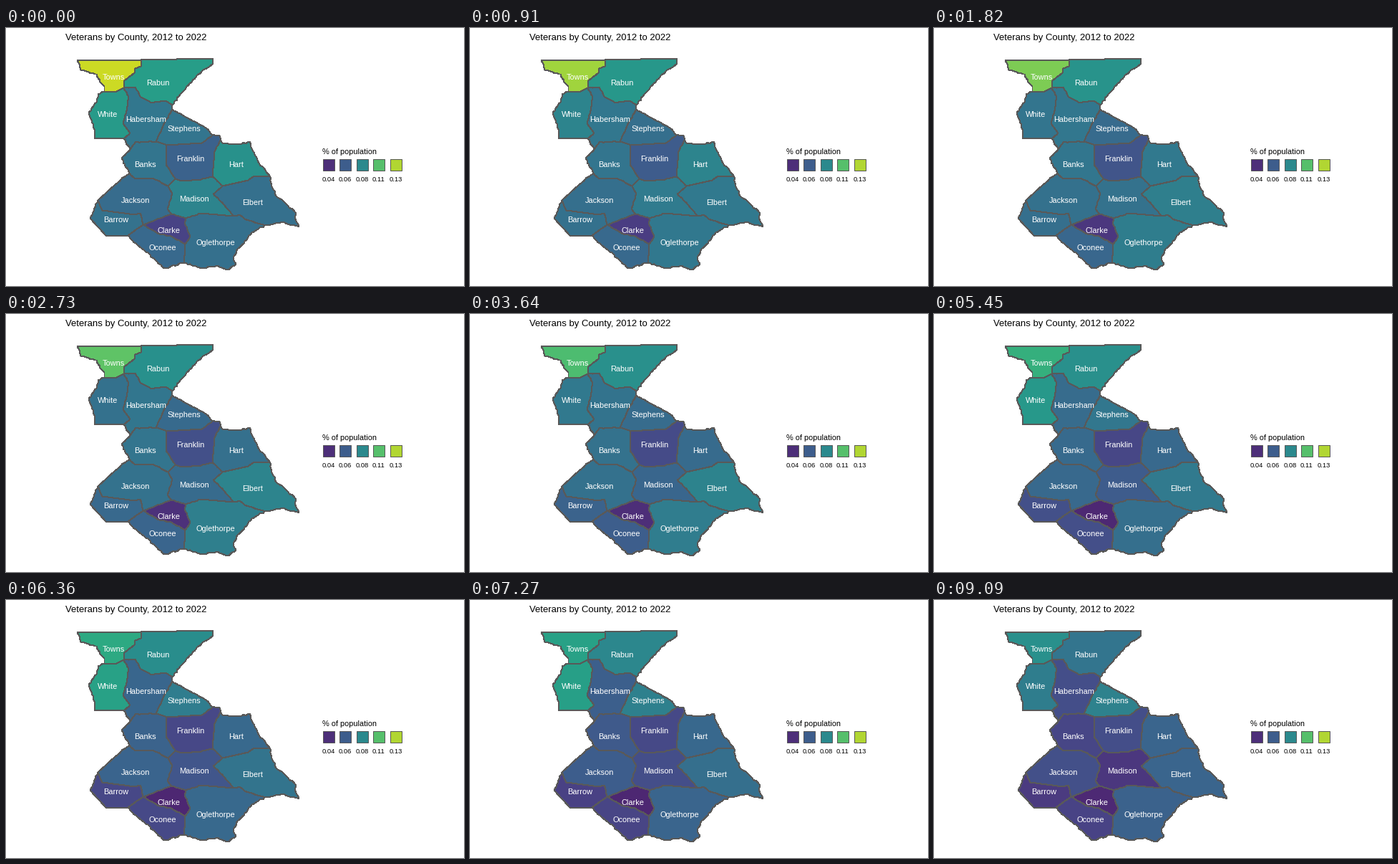
Animation of 640x360 px, one loop 10000 ms. Source, as a matplotlib script:

```python
import numpy as np
import matplotlib.pyplot as plt
from matplotlib.animation import FuncAnimation
from matplotlib.patches import Polygon, Rectangle

WIDTH, HEIGHT, DPI = 640, 360, 100
FRAMES, INTERVAL = 100, 100
YEARS = 11
PX = 72 / DPI
EDGE = dict(ec="#595959", lw=PX)

plt.rcParams["font.family"] = "Liberation Sans"
rng = np.random.default_rng(4)
borders = {}

# Junctions on the coast of the map, clockwise from the top, then inside it
A, B, C, D, E = (188, 44), (232, 107), (232, 113), (288, 149), (299, 156)
F, G, H, I, J = (368, 206), (361, 275), (248, 327), (170, 289), (128, 240)
K, L, M, N = (172, 202), (173, 169), (164, 154), (137, 88)
O, Q, R, S, T = (164, 83), (209, 158), (224, 163), (236, 210), (226, 220)
U, V, W, X, Y = (288, 207), (302, 220), (317, 262), (251, 265), (231, 259)
Z, P = (191, 274), (250, 301)


def rough(pts, amp):
    """Split a line into short uneven steps; long surveyed lines stay straight."""
    out = [pts[0]]
    for a, b in zip(np.array(pts[:-1], float), np.array(pts[1:], float)):
        n = int(np.hypot(*(b - a)) // 3)
        if n < 10:
            out += [tuple(a + (b - a) * k / n + rng.uniform(-amp, amp, 2))
                    for k in range(1, n)]
        out.append(tuple(b))
    return out


def arc(names, *pts):
    """Register a line as part of the ring of each county it bounds."""
    names = names.split()
    line = rough(pts, 1 if len(names) == 1 else .5)
    for name in names:
        borders.setdefault(name, []).append(line)


def outline(name):
    """Join a county's lines end to end."""
    rest = list(borders[name])
    ring = list(rest.pop(0))
    while rest:
        line = next(b for b in rest if ring[-1] in (b[0], b[-1]))
        rest.remove(line)
        ring += line[1:] if line[0] == ring[-1] else line[-2::-1]
    return np.array(ring)


def label_point(ring):
    """Middle of the widest span at half height."""
    x, y = ring.T
    mid = (y.min() + y.max()) / 2 + .01
    x2, y2 = np.roll(x, -1), np.roll(y, -1)
    cut = (y < mid) != (y2 < mid)
    hits = np.sort((x + (mid - y) * (x2 - x) / np.where(cut, y2 - y, 1))[cut])
    left, right = max(zip(hits[::2], hits[1::2]), key=lambda s: s[1] - s[0])
    return (left + right) / 2, mid


# Outer lines
arc("Towns", A, (99, 45), (104, 58), (126, 64), (131, 75), (137, 81), N)
arc("Rabun", A, (288, 42), (289, 49), (273, 60), (256, 77), (243, 92), B)
arc("Habersham", B, C)
arc("Stephens", C, (243, 119), (253, 125), (279, 139), D)
arc("Franklin", D, (298, 150), E)
arc("Hart", E, (302, 160), (325, 162), (340, 158), (346, 173), (353, 188), F)
arc("Elbert", F, (371, 221), (379, 236), (394, 248), (404, 257), (403, 264),
    (409, 277), (386, 270), G)
arc("Oglethorpe", G, (343, 285), (336, 295), (324, 307), (317, 322), (321, 328),
    (310, 337), (295, 331), (275, 335), H)
arc("Oconee", H, (221, 335), (208, 323), (195, 312), (183, 302), I)
arc("Barrow", I, (140, 290), (117, 265), J)
arc("Jackson", J, (152, 218), K)
arc("Banks", K, (161, 181), L)
arc("Habersham", L, M)
arc("White", M, (123, 153), (124, 143), (115, 117), (126, 103), (128, 92), N)

# Lines between neighbours
arc("Towns Rabun", A, (188, 53), (180, 56), (179, 62), (164, 74), O)
arc("Towns White", N, (152, 89), O)
arc("Rabun Habersham", O, (180, 82), (187, 95), (203, 104), (222, 101), B)
arc("White Habersham", O, (171, 95), (168, 115), (163, 133), (173, 146), M)
arc("Habersham Stephens", C, (221, 132), Q)
arc("Habersham Banks", L, (180, 159), Q)
arc("Stephens Banks", Q, R)
arc("Stephens Franklin", R, (273, 160), D)
arc("Banks Franklin", R, (223, 190), S)
arc("Banks Madison", S, T)
arc("Banks Jackson", K, (180, 210), (205, 209), T)
arc("Franklin Hart", E, (291, 172), U)
arc("Franklin Madison", S, (245, 213), (272, 211), U)
arc("Hart Madison", U, V)
arc("Hart Elbert", F, (345, 207), (338, 212), V)
arc("Madison Elbert", V, (289, 231), (304, 246), W)
arc("Jackson Madison", T, (232, 231), (225, 252), Y)
arc("Jackson Barrow", J, (134, 254), (180, 260), (187, 258), Z)
arc("Jackson Clarke", Z, (209, 267), Y)
arc("Madison Clarke", Y, X)
arc("Madison Oglethorpe", X, (272, 258), W)
arc("Elbert Oglethorpe", W, (327, 261), (333, 266), G)
arc("Barrow Oconee", I, Z)
arc("Clarke Oconee", Z, (214, 287), (230, 290), P)
arc("Clarke Oglethorpe", X, (249, 272), (257, 290), P)
arc("Oconee Oglethorpe", P, H)

# First and last share on the colour scale, bow and wave of the path between
TRENDS = {
    "Towns": (.93, .50, -.04, -.02),
    "Rabun": (.565, .38, .03, -.03),
    "White": (.55, .42, -.015, -.14),
    "Habersham": (.39, .22, .055, 0),
    "Stephens": (.38, .44, -.045, -.03),
    "Banks": (.38, .19, .07, 0),
    "Franklin": (.30, .22, -.06, 0),
    "Hart": (.51, .31, -.08, -.025),
    "Jackson": (.34, .23, .065, .01),
    "Madison": (.45, .14, 0, -.02),
    "Elbert": (.36, .31, .095, .025),
    "Barrow": (.37, .15, .005, .025),
    "Clarke": (.18, .09, -.04, 0),
    "Oconee": (.33, .18, 0, .025),
    "Oglethorpe": (.36, .30, .06, .04),
}


def level(name, u):
    first, last, bow, wave = TRENDS[name]
    return first + (last - first) * u + bow * np.sin(np.pi * u) + wave * np.sin(2 * np.pi * u)


def shade(t):
    return .92 * np.array(plt.cm.viridis(float(t))[:3]) + .08 * .52


fig = plt.figure(figsize=(WIDTH / DPI, HEIGHT / DPI), dpi=DPI, facecolor="white")
ax = fig.add_axes([0, 0, 1, 1])
ax.set(xlim=(-.5, WIDTH - .5), ylim=(HEIGHT - .5, -.5))
ax.axis("off")


def write(x, y, s, px, color="black", ha="left"):
    ax.text(x, y, s, fontsize=px * PX, color=color, ha=ha, va="baseline", zorder=5)


shapes = {}
for name in TRENDS:
    ring = outline(name)
    shapes[name] = ax.add_patch(Polygon(ring, antialiased=False, **EDGE))
    x, y = label_point(ring)
    write(x, y + 5, name, 11, "white", "center")

write(82.5, 17, "Veterans by County, 2012 to 2022", 13.1)
write(441, 176, "% of population", 11)
for i, (s, t) in enumerate([("0.04", .11), ("0.06", .28), ("0.08", .47),
                            ("0.11", .73), ("0.13", .89)]):
    x = 442 + 23.5 * i
    ax.add_patch(Rectangle((x, 182), 16, 16, fc=shade(t), snap=True, **EDGE))
    write(x + 8, 213, s, 9.3, ha="center")


def draw(i):
    year = min(int((i + 1) * YEARS / FRAMES), YEARS - 1)
    for name, shape in shapes.items():
        shape.set_facecolor(shade(level(name, year / (YEARS - 1))))
    return list(shapes.values())


anim = FuncAnimation(fig, draw, frames=FRAMES, interval=INTERVAL,
                     repeat=True, repeat_delay=0, blit=False)
plt.show()
```
